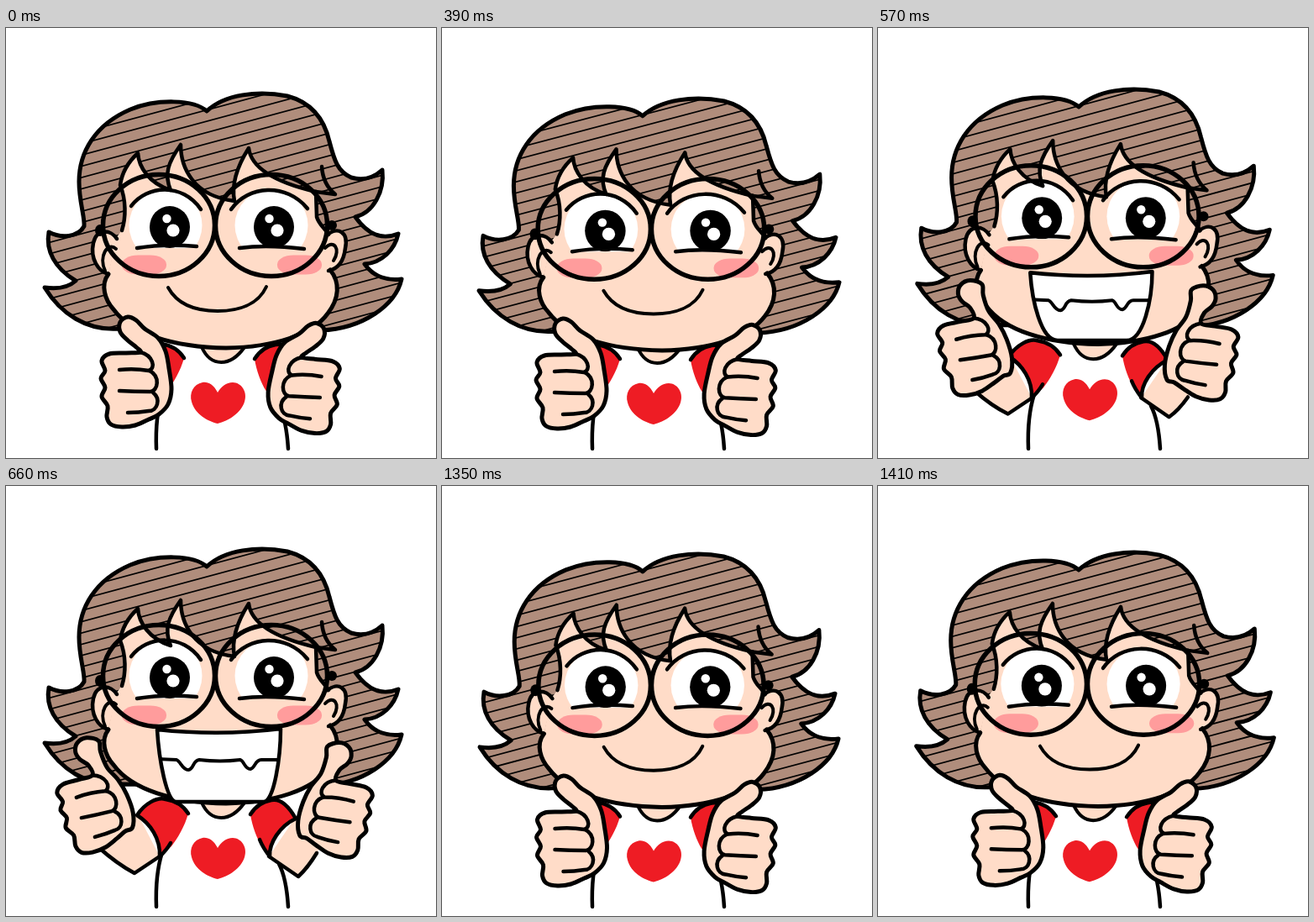
Write an HTML page with a canvas that moves like this. It is 512 by 512 pixels and loops after 1.47 s.

```html
<!DOCTYPE html>
<html>
<head>
<meta charset="utf-8">
<style>
html, body { margin: 0; width: 100%; height: 100%; overflow: hidden; background: #fff; }
canvas { display: block; width: 100vw; height: 100vh; }
</style>
</head>
<body>
<canvas id="stage" width="512" height="512"></canvas>
<script>
const ctx = document.getElementById('stage').getContext('2d');
const SKIN = '#ffdcc8', HAIR = '#b08d7c', RED = '#ee1c24', BLUSH = '#ff9c9c', INK = '#000';

// head: scale x, scale y, shift y, extra lift of the eyes
// left, right: fist centre and rotation in degrees
// mouth: left corner, right corner, bottom, half width, roundness, teeth line
// armL, armR: wrist, elbow, armpit
const calm = { open: 0, head: [1, 1, 0, 0], body: [0], left: [148, 430, 0], right: [361, 437, -4] };
const squash = { open: 0, head: [1.0094, .99, 6.8, 0], body: [1], left: [147, 432, 0], right: [361, 439, -4] };
const rise = {
  open: 1, head: [.986, 1.0066, -11.5, -6], body: [-6],
  left: [135, 394, 0], right: [371, 400, -2],
  mouth: [185, 295, 325, 293, 360, 8, 45, 319],
  armL: [130, 438, 160, 455, 184, 439], armR: [366, 447, 342, 458, 314, 438]
};
const grin = {
  open: 1, head: [1, 1, -3, -6], body: [-3],
  left: [102, 390, -14], right: [397, 396, -10],
  mouth: [180, 290, 327, 289, 376, 52, 12, 326],
  armL: [110, 430, 153, 461, 183, 441], armR: [370, 437, 348, 465, 313, 441]
};
const settle = {
  open: 1, head: [1, 1.002, -4.7, -4.5], body: [-3],
  left: [112, 411, -7], right: [389, 415, -4],
  mouth: [183, 304, 323, 302, 356, 30, 35, 328],
  armL: [118, 448, 153, 467, 183, 441], armR: [370, 460, 350, 468, 313, 441]
};

function mix(a, b, t) {
  const pose = { open: a.open };
  for (const key in a) {
    if (key !== 'open') pose[key] = a[key].map((v, i) => v + (b[key][i] - v) * t);
  }
  return pose;
}

const LOOP = 1470;
const steps = [
  [0, calm], [390, squash], [480, rise], [570, mix(rise, grin, .75)], [660, grin],
  [1260, settle], [1350, mix(calm, squash, .5)], [1410, mix(calm, squash, .18)]
];

function fill(d, color) {
  ctx.fillStyle = color;
  ctx.fill(typeof d === 'string' ? new Path2D(d) : d);
}

function line(d, width = 4.5) {
  ctx.lineWidth = width;
  ctx.strokeStyle = INK;
  ctx.stroke(typeof d === 'string' ? new Path2D(d) : d);
}

function oval(x, y, rx, ry = rx) {
  const p = new Path2D();
  p.ellipse(x, y, rx, ry, 0, 0, Math.PI * 2);
  return p;
}

// closed smooth curve through the points
function loopThrough(pts) {
  const p = new Path2D(), n = pts.length, at = i => pts[(i + n) % n];
  p.moveTo(...pts[0]);
  for (let i = 0; i < n; i++) {
    const [a, b, c, d] = [at(i - 1), at(i), at(i + 1), at(i + 2)];
    p.bezierCurveTo(b[0] + (c[0] - a[0]) / 6, b[1] + (c[1] - a[1]) / 6,
      c[0] - (d[0] - b[0]) / 6, c[1] - (d[1] - b[1]) / 6, c[0], c[1]);
  }
  return p;
}

function drawArm([ax, ay, bx, by, cx, cy], hand, shoulder) {
  fill(`M${shoulder} L${hand[0]},${hand[1]} L${ax},${ay} L${bx},${by} L${cx},${cy}Z`, SKIN);
  const mx = (ax + bx) / 2, my = (ay + by) / 2 + 4;
  line(`M${ax},${ay} Q${mx},${my} ${bx},${by} L${cx},${cy}`);
}

function drawBody(p) {
  ctx.save();
  ctx.translate(0, p.body[0]);
  const neck = 'M233,380 C244,404 267,404 284,380';
  fill(neck, SKIN);
  line(neck, 4);
  fill('M252,434 C247,424 240,421 234,422 C223,424 218,435 221,445 C225,460 240,468 252,471 ' +
    'C265,468 280,458 284,445 C288,433 280,422 270,422 C262,422 256,427 252,434Z', RED);
  ctx.restore();

  line('M186,436 C180,455 178,475 179,501');
  line('M325,450 C333,465 335,485 336,501');
  if (p.open) {
    drawArm(p.armL, p.left, '158,393');
    drawArm(p.armR, p.right, '343,397');
  }

  const lift = p.body[0] + 3, inset = p.open ? 0 : 5;
  ctx.save();
  ctx.translate(-inset, lift);
  fill('M156,392 C165,378 180,370 190,373 C203,375 212,382 217,390 C213,405 204,420 197,429 L183,441 C184,420 172,402 156,392Z', RED);
  line('M183,441 C184,420 172,402 156,392 C165,378 180,370 190,373 C203,375 212,382 217,390');
  if (p.open) line('M183,441 Q191,434 196,425');
  ctx.restore();
  ctx.save();
  ctx.translate(inset + 1, lift);
  fill('M344,396 C335,380 325,372 315,374 C303,376 295,383 290,391 C292,405 298,420 303,428 L313,441 C312,425 325,405 344,396Z', RED);
  line('M313,441 C312,425 325,405 344,396 C335,380 325,372 315,374 C303,376 295,383 290,391');
  if (p.open) line('M313,441 Q305,431 301,421');
  ctx.restore();
}

const hairShape = new Path2D('M239,99 C224,85 180,84 148,97 C106,115 87,148 87,183 C87,207 94,225 93,236 ' +
  'C86,249 66,251 51,243 C47,265 58,286 83,301 C74,309 60,311 46,309 C65,340 96,361 135,358 L375,360 ' +
  'C425,358 464,330 471,299 C455,301 438,297 427,281 C447,280 463,264 467,245 C447,253 431,246 416,225 ' +
  'C437,220 451,195 448,169 C437,179 425,182 411,178 C395,171 391,158 385,135 C379,109 365,89 335,81 C300,74 260,79 239,99Z');
const fringe = 'M138,241 C143,225 143,205 136,187 C138,172 145,160 157,149 C158,165 170,185 196,193 ' +
  'C188,174 193,160 208,139 C208,165 222,200 272,206 C268,185 275,165 289,143 C292,168 322,184 369,195';
const cheeks = 'M122,293 C112,306 118,324 128,335 C150,365 200,380 262,381 C320,380 365,365 383,340 C397,322 398,303 386,288';
const earL = 'M132,251 C125,240 108,238 104,256 C100,275 110,290 122,293';
const earR = 'M383,246 C395,236 408,243 404,262 C402,280 394,287 384,289';

function drawEye(x, white, shineX) {
  ctx.save();
  ctx.beginPath();
  ctx.rect(x - 60, 180, 120, 82);
  ctx.clip();
  fill(oval(white, 235, 43.5, 43), '#fff');
  fill(oval(x, 237, 24, 25), INK);
  ctx.restore();
  fill(oval(shineX, 227, 5.2), '#fff');
  fill(oval(x + 4, 241, 7.6), '#fff');
}

function drawMouth([lx, ly, rx, ry, b, w, k, t]) {
  const h = (b - ly) * .4, l = 255 - w, r = 255 + w;
  const d = `M${lx},${ly} Q255,${ly + 8} ${rx},${ry} C${rx},${ry + h} ${r + k},${b} ${r},${b} ` +
    `L${l},${b} C${l - k},${b} ${lx + 2},${ly + h} ${lx},${ly}Z`;
  fill(d, '#fff');
  ctx.save();
  ctx.clip(new Path2D(d));
  line(`M${lx},${t - 1} L203,${t} C208,${t + 2} 210,${t + 12} 217,${t + 12} C224,${t + 11} 222,${t + 1} 230,${t} ` +
    `Q255,${t + 3} 279,${t} C284,${t + 2} 284,${t + 11} 291,${t + 11} C297,${t + 10} 296,${t} 304,${t} L${rx},${t}`, 4);
  ctx.restore();
  line(d);
}

function drawHead(p) {
  const [sx, sy, ty, eyes] = p.head;
  ctx.save();
  ctx.translate(258.5 * (1 - sx), ty);
  ctx.scale(sx, sy);

  fill(hairShape, HAIR);
  ctx.save();
  ctx.clip(hairShape);
  for (let y = 30; y < 420; y += 13.4) line(`M30,${y + 57} L490,${y - 67}`, 1.7);
  ctx.restore();
  line(hairShape, 5);

  fill(earL, SKIN);
  fill(earR, SKIN);
  fill(fringe + ' L369,225 C372,235 380,238 384,246 L386,288 C398,303 397,322 383,340 C365,365 320,380 262,381 ' +
    'C200,380 150,365 128,335 C118,324 112,306 122,293 L131,250Z', SKIN);
  line(earL);
  line(earR);
  line('M131,263 C121,254 110,272 118,289', 4);
  line('M380,262 C390,251 399,263 390,277', 4);
  line(cheeks, 5);

  ctx.save();
  ctx.translate(0, eyes);
  for (const x of [138, 323]) {
    ctx.beginPath();
    ctx.roundRect(x, 270.5, 53, 23, [{ x: 19, y: 11 }]);
    ctx.fillStyle = BLUSH;
    ctx.fill();
  }
  drawEye(195, 190, 191.5);
  drawEye(319, 316, 313.5);
  line('M149,212 C168,187 210,184 232,216');
  line('M268,216 C288,187 334,184 359,215');
  line('M156,262 C180,258 205,258 227,260');
  line('M278,262 C300,259 330,260 355,263');
  ctx.restore();

  line(fringe);
  line('M369,195 L392,198 C382,190 377,180 376,165');
  line('M369,195 L370,225 C373,235 380,238 384,246');

  ctx.translate(0, eyes);
  line(oval(182, 235, 66.5, 60.5), 5.5);
  line(oval(316, 235, 66.5, 60.5), 5.5);
  fill(oval(112, 241, 6, 7), INK);
  fill(oval(388, 235, 6, 6), INK);
  ctx.translate(0, -eyes);
  if (!p.open) line('M193,309 C205,331 230,337 252,337 C276,337 300,330 310,308', 4);
  ctx.restore();
  if (p.open) drawMouth(p.mouth);
}

const fist = [[12, -44], [-5, -43], [-25, -42], [-34, -34], [-30, -22], [-35, -13], [-30, -2], [-34, 9],
  [-27, 20], [-28, 33], [-23, 42], [-10, 45], [6, 43], [22, 36], [34, 30]];
const thumbs = [
  [[45, 18], [49, 0], [46, -25], [42, -45], [33, -61], [17, -72], [7, -82], [-3, -86], [-12, -80], [-12, -68], [-3, -58], [7, -50]],
  [[43, 28], [48, 11], [46, -12], [40, -32], [31, -49], [28, -69], [29, -82], [16, -89], [4, -86], [-1, -76], [2, -66], [10, -57]]
];
const hands = thumbs.map(thumb => loopThrough([...fist, ...thumb]));

function drawHand([x, y, turn], open, flip) {
  ctx.save();
  ctx.translate(x, y);
  ctx.scale(flip, 1);
  ctx.rotate(turn * Math.PI / 180);
  fill(hands[open], SKIN);
  line(hands[open], 5);
  line('M12,-44 C27,-40 31,-25 22,-22 Q5,-25 -13,-23');
  line('M23,-22 C36,-15 33,2 24,3 Q5,3 -13,2');
  line('M27,4 C37,12 32,26 22,26 Q10,28 -3,28');
  ctx.restore();
}

function draw(now) {
  const t = now % LOOP;
  let pose = calm;
  for (const [start, next] of steps) if (t >= start) pose = next;
  ctx.fillStyle = '#fff';
  ctx.fillRect(0, 0, 512, 512);
  ctx.lineCap = ctx.lineJoin = 'round';
  drawBody(pose);
  drawHead(pose);
  drawHand(pose.left, pose.open, 1);
  drawHand(pose.right, pose.open, -1);
}

const began = performance.now();
function tick() {
  draw(performance.now() - began);
  requestAnimationFrame(tick);
}
tick();
</script>
</body>
</html>
```
